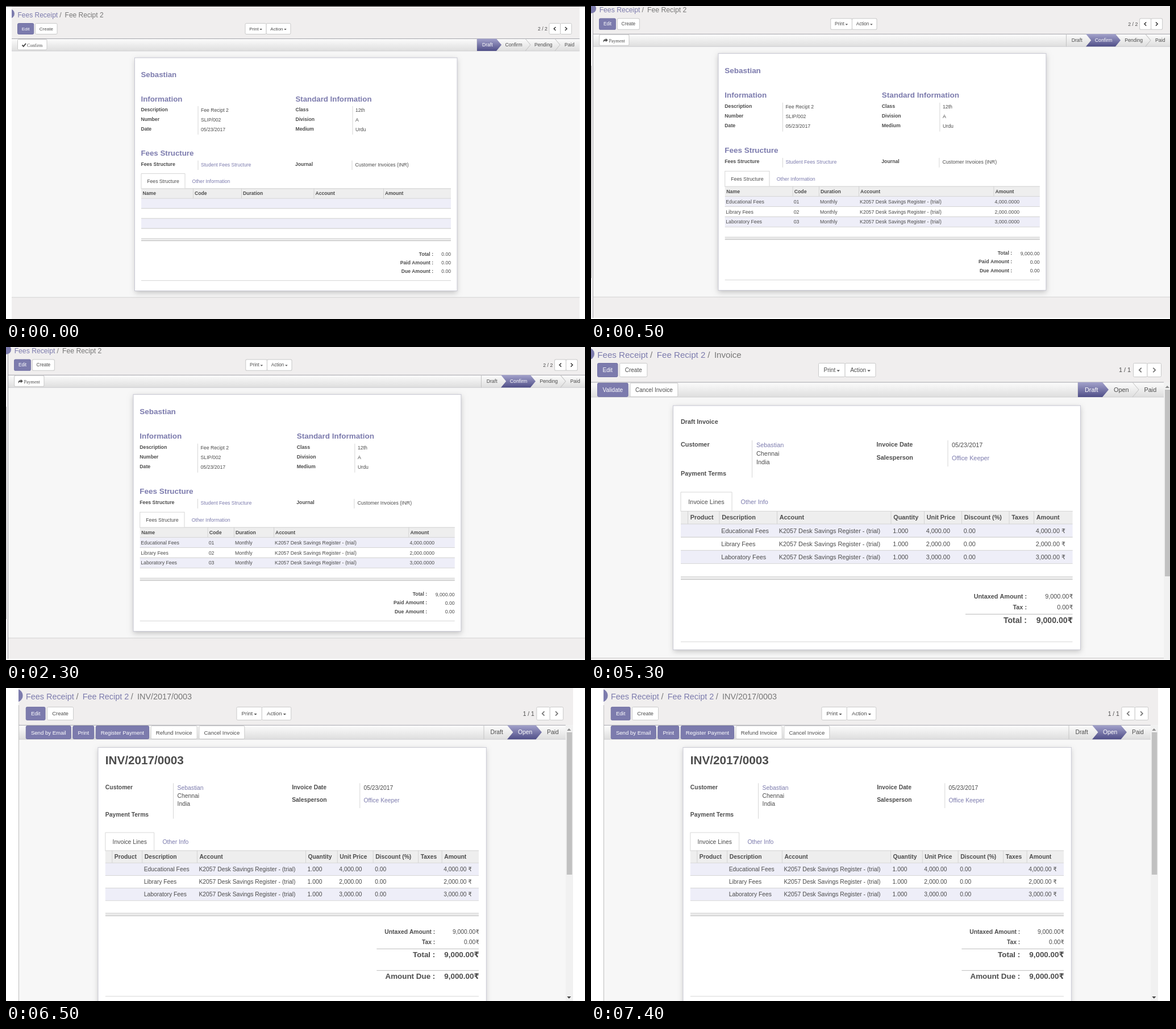
An HTML page with a canvas for the animation above (8000 ms loop, 1019 by 550 pixels).

```html
<!DOCTYPE html>
<html lang="en">
<head>
<meta charset="utf-8">
<title>Fee receipt to invoice</title>
<style>
html, body { margin: 0; width: 100%; height: 100%; overflow: hidden; background: #fff; }
canvas { display: block; }
</style>
</head>
<body>
<canvas id="stage" width="1019" height="550"></canvas>
<script>
const ctx = document.getElementById('stage').getContext('2d');
const INK = '#4c4c4c', PURPLE = '#7c7bad', PANEL = '#f0eeee', LINE = '#d6d6d6', TINT = '#eeeef8';
const SANS = '"Liberation Sans", Arial, sans-serif';
const STUDENT = 'Sebastian', CLERK = 'Office Keeper';
const LEDGER = 'K2057 Desk Savings Register - (trial)';
const FEES = [['Educational Fees', '4,000.00'], ['Library Fees', '2,000.00'], ['Laboratory Fees', '3,000.00']];

// y is the middle of the capitals
function text(s, x, y, size, { color = INK, bold = false, align = 'left', family = SANS } = {}) {
  ctx.font = `${bold ? 'bold ' : ''}${size}px ${family}`;
  ctx.textAlign = align;
  ctx.fillStyle = color;
  ctx.fillText(s, x, y + size * 0.36);
  return ctx.measureText(s).width;
}

const rupee = (x, y, size, style) => text('₹', x, y, size, { ...style, family: '"DejaVu Sans", sans-serif' });

function rect(x1, y1, x2, y2, fill) {
  ctx.fillStyle = fill;
  ctx.fillRect(x1, y1, x2 - x1, y2 - y1);
}

const hLine = (x1, x2, y, color = LINE) => rect(x1, y, x2, y + 1, color);
const vLine = (x, y1, y2, color = LINE) => rect(x, y1, x + 1, y2, color);

function poly(points, fill, stroke, width = 1) {
  ctx.beginPath();
  points.forEach(([x, y]) => ctx.lineTo(x, y));
  if (fill) { ctx.fillStyle = fill; ctx.fill(); }
  if (stroke) { ctx.strokeStyle = stroke; ctx.lineWidth = width; ctx.stroke(); }
}

function box(x, y, w, h, primary) {
  ctx.beginPath();
  ctx.roundRect(x, y, w, h, 2);
  ctx.fillStyle = primary ? PURPLE : '#fff';
  ctx.fill();
  ctx.strokeStyle = primary ? '#6f6ea2' : '#c9c9c9';
  ctx.lineWidth = 1;
  ctx.stroke();
}

// Returns the right edge
function button(label, x, y, h, size, { primary, caret } = {}) {
  const pad = size * 0.9;
  ctx.font = `${size}px ${SANS}`;
  const labelW = ctx.measureText(label).width;
  const w = labelW + pad * 2 + (caret ? size * 0.78 : 0);
  box(x, y, w, h, primary);
  text(label, x + pad, y + h / 2, size, { color: primary ? '#fff' : INK });
  if (caret) {
    const cx = x + pad + labelW + size * 0.5, r = size * 0.28, cy = y + h / 2;
    poly([[cx - r, cy], [cx + r, cy], [cx, cy + r]], INK);
  }
  return x + w;
}

function buttonRow(labels, x, y, h, size, primaryCount) {
  labels.forEach((label, i) => {
    x = button(label, x, y, h, size, { primary: i < primaryCount }) + size * 0.37;
  });
}

function pager(label, labelX, x, y, w, h, size, color) {
  text(label, labelX, y + h / 2, size);
  [-1, 1].forEach((dir, i) => {
    const left = x + i * w, cx = left + w / 2, cy = y + h / 2, r = size * 0.36;
    box(left, y, w, h);
    poly([[cx - dir * r / 2, cy - r], [cx + dir * r / 2, cy], [cx - dir * r / 2, cy + r]], null, color, size * 0.17);
  });
}

function crumbs(names, x, y, size) {
  names.forEach((name, i) => {
    const last = i === names.length - 1;
    x += text(name, x, y, size, { color: last ? '#777' : PURPLE });
    if (!last) {
      text('/', x + size * 0.25, y, size, { color: '#777' });
      x += size * 1.03;
    }
  });
}

function badge(x, y, r, left) {
  ctx.save();
  ctx.beginPath();
  ctx.rect(left, -20, 60, 80);
  ctx.clip();
  ctx.beginPath();
  ctx.arc(x, y, r, 0, 7);
  ctx.fillStyle = PURPLE;
  ctx.fill();
  ctx.restore();
}

function gradient(y1, y2, from, to) {
  const g = ctx.createLinearGradient(0, y1, 0, y2);
  g.addColorStop(0, from);
  g.addColorStop(1, to);
  return g;
}

// Stages: [label, text x, right edge of body]; each body ends in an arrow tip
function statusBar(x1, x2, y1, y2, start, stages, current, size, tip) {
  const mid = (y1 + y2) / 2;
  rect(x1, y1, x2, y2, gradient(y1, y2, '#fcfcfc', '#dedede'));
  hLine(x1, x2, y1 - 0.5, '#a5a5ac');
  hLine(x1, x2, y2 - 0.5, '#cfcfd2');
  vLine(start - 0.5, y1, y2, '#c4c4c4');
  let left = start;
  stages.forEach(([label, x, end], i) => {
    const arrow = [[end, y1], [end + tip, mid], [end, y2]];
    if (i === current) {
      const notch = i ? [[left, y2], [left + tip, mid], [left, y1]] : [[left, y2], [left, y1]];
      poly([...arrow, ...notch], gradient(y1, y2, '#a3a2cb', '#504f88'));
    } else if (i < stages.length - 1 && i + 1 !== current) {
      poly(arrow, null, '#c2c2c2');
    }
    text(label, x, mid - 0.3, size, { color: i === current ? '#fff' : INK });
    left = end;
  });
}

function sheet(x, y, w, h) {
  ctx.save();
  ctx.shadowColor = 'rgba(0,0,0,.22)';
  ctx.shadowBlur = 9;
  ctx.shadowOffsetY = 3;
  rect(x, y, x + w, y + h, '#fff');
  ctx.restore();
  ctx.strokeStyle = '#c8c8d3';
  ctx.lineWidth = 1;
  ctx.strokeRect(x, y, w, h);
}

function tabs(x1, x2, right, y1, y2, active, other, otherX, size) {
  hLine(x1, right, y2, LINE);
  poly([[x1, y2 + 1], [x1, y1], [x2, y1], [x2, y2 + 1]], '#fff', LINE);
  const y = (y1 + y2) / 2 + 0.4;
  text(active, (x1 + x2) / 2, y, size, { align: 'center' });
  text(other, otherX, y, size, { color: PURPLE });
}

function table({ x1, x2, top, head, pitch, rowCount, dividers, labels, inset, rows, size }) {
  const starts = [x1, ...dividers];
  const first = top + head;
  rect(x1, top, x2, first, '#eee');
  hLine(x1, x2, top, LINE);
  dividers.forEach(x => vLine(x - 0.5, top, first, '#d2d2d2'));
  labels.forEach((s, i) => text(s, starts[i] + inset, top + head / 2, size, { bold: true }));
  for (let r = 0; r < rowCount; r++) {
    const y = first + r * pitch;
    if (r % 2 === 0) rect(x1, y, x2, y + pitch, TINT);
    hLine(x1, x2, y - 0.5);
    hLine(x1, x2, y + pitch - 0.5);
    (rows[r] || []).forEach((s, i) => {
      const [number, currency] = s.split('₹');
      const x = starts[i] + inset - 1, mid = y + pitch / 2;
      const w = text(number, x, mid, size);
      if (currency !== undefined) rupee(x + w, mid, size);
    });
  }
}

function tableFoot(x1, x2, y, h) {
  rect(x1, y, x2, y + h, '#ebebeb');
  hLine(x1, x2, y, LINE);
  hLine(x1, x2, y + h - 1, '#bdbdbd');
}

function receipt(confirmed) {
  const size = 8.6, small = 8, title = 13.25;
  const heading = (s, x, y) => text(s, x, y, title, { bold: true, color: PURPLE });
  const field = (label, value, x, valueX, y, color) => {
    text(label, x, y, size, { bold: true });
    text(value, valueX, y + 1, size, { color });
  };
  rect(10, 0, 1009.5, 560, PANEL);
  rect(10, 79, 1009.5, 512, '#f7f7f7');
  hLine(10, 1009.5, 511.5, '#d4d4d4');
  badge(7, 13.5, 8, confirmed ? 0 : 10);
  crumbs(['Fees Receipt', 'Fee Recipt 2'], 20.5, 15.5, 12);
  buttonRow(['Edit', 'Create'], 20.5, 30.5, 19, small, 1);
  const actionX = button('Print', 421, 30.5, 19, small, { caret: true });
  button('Action', actionX, 30.5, 19, small, { caret: true });
  pager('2 / 2', 936, 956, 30.5, 19.7, 19, size, '#333');

  statusBar(10, 1009.5, 57.5, 79, 829, [['Draft', 838, 863], ['Confirm', 878.5, 914], ['Pending', 930, 966], ['Paid', 983, 1009]], confirmed ? 1 : 0, size, 9);
  box(20.5, 58.5, 51.5, 18.5);
  text(confirmed ? 'Payment' : 'Confirm', 37, 68.7, small, { family: '"Liberation Serif", "Times New Roman", serif' });
  if (confirmed) {
    poly([[27.5, 72], [27.5, 68.5], [29, 66.8], [31.5, 66.8], [31.5, 64.8], [35.5, 68], [31.5, 71.2], [31.5, 69.2], [29.3, 69.2]], INK);
  } else {
    poly([[28.5, 68.5], [30.8, 71], [35, 65.8]], null, INK, 1.9);
  }

  sheet(226.5, 91, 567.5, 409.5);
  heading(STUDENT, 237.5, 120);
  heading('Information', 237.5, 163);
  heading('Standard Information', 509.5, 163);
  vLine(337.5, 176, 226);
  vLine(609.5, 176, 226);
  [['Description', 'Fee Recipt 2', 'Class', '12th'], ['Number', 'SLIP/002', 'Division', 'A'], ['Date', '05/23/2017', 'Medium', 'Urdu']]
    .forEach(([a, b, c, d], i) => {
      const y = 181.5 + i * 17;
      field(a, b, 237.5, 343, y);
      field(c, d, 509.5, 615, y);
    });
  heading('Fees Structure', 237.5, 258.3);
  vLine(337.5, 271.5, 288);
  vLine(608.5, 271.5, 288);
  field('Fees Structure', 'Student Fees Structure', 237.5, 343, 277.7, PURPLE);
  field('Journal', 'Customer Invoices (INR)', 509, 614.5, 277.7);

  tabs(238, 315, 783, 294.5, 320.5, 'Fees Structure', 'Other Information', 327.5, size);
  table({
    x1: 238, x2: 783, top: 320.5, head: 17.6, pitch: 17.6, inset: 2.5, size,
    rowCount: confirmed ? 3 : 4,
    dividers: confirmed ? [355.5, 401, 470, 703.5] : [329.5, 414.5, 542, 664.5],
    labels: ['Name', 'Code', 'Duration', 'Account', 'Amount'],
    rows: confirmed ? FEES.map(([name, fee], i) => [name, '0' + (i + 1), 'Monthly', LEDGER, fee + '00']) : []
  });
  tableFoot(238, 783, 408, 5);
  const labelX = confirmed ? 735.3 : 752;
  [['Total :', confirmed ? '9,000.00' : '0.00'], ['Paid Amount :', '0.00'], ['Due Amount :', '0.00']].forEach(([label, value], i) => {
    text(label, labelX, 436 + i * 15, size, { bold: true, align: 'right' });
    text(value, 783, 436.3 + i * 15, size, { align: 'right' });
  });
  hLine(238, 783, 482);
}

function invoice(open) {
  const size = 10.85, small = 10.05, big = 14.05;
  const left = -2.4, right = 1021.7;
  const label = (s, x, y) => text(s, x, y, size, { bold: true });
  const link = (s, x, y) => text(s, x, y, size, { color: PURPLE });
  rect(left, -20, right, 62, PANEL);
  rect(left, 62, 1008, 580, '#f7f7f7');
  const crumbY = open ? 8.9 : 13.5;
  badge(open ? -6.5 : -4.5, crumbY - 1.5, open ? 12 : 10.5, left);
  crumbs(['Fees Receipt', 'Fee Recipt 2', open ? 'INV/2017/0003' : 'Invoice'], 11.3, crumbY, 15.1);
  buttonRow(['Edit', 'Create'], 11.5, 28.5, 24, small, 1);
  const actionX = button('Print', 400.5, 28.5, 24, small, { caret: true });
  button('Action', actionX, 28.5, 24, small, { caret: true });
  pager('1 / 1', 929, 954.5, 28.5, 24.5, 24, size, '#777');

  statusBar(left, 1008, 62, 88, 857, [['Draft', 869, 900], ['Open', 920, 953], ['Paid', 973.5, 1008]], open ? 1 : 0, size, 11);
  if (open) buttonRow(['Send by Email', 'Print', 'Register Payment', 'Refund Invoice', 'Cancel Invoice'], 11.5, 63.3, 24, small, 3);
  else buttonRow(['Validate', 'Cancel Invoice'], 11.5, 63.3, 24, small, 1);

  rect(1008, 62, right, 580, '#f1f1f1');
  rect(1010, 75, 1020, open ? 337.5 : 403, '#c1c1c1');
  poly([[1010.5, 72], [1018, 72], [1014.2, 68]], '#8a8a8a');
  if (open) {
    poly([[1010.5, 562], [1018, 562], [1014.2, 566]], '#444');
    vLine(left, 25, 580, '#bbb');
  } else {
    rect(0, 547, 1008, 549, PANEL);
    hLine(0, 1008, 546, '#cfcfcf');
    rect(0, 549, 1019, 550, '#fff');
  }

  sheet(144.5, 103, 717, open ? 520 : 429);
  if (open) text('INV/2017/0003', 158, 126.5, 21.7, { bold: true });
  else label('Draft Invoice', 158, 131);

  ctx.translate(0, open ? 4.9 : 0);
  vLine(283, 164, 229.5);
  vLine(627.5, 164, 210);
  label('Customer', 158, 171);
  label('Payment Terms', 158, 222);
  link(STUDENT, 291, 172);
  text('Chennai', 291, 187, size);
  text('India', 291, 202, size);
  label('Invoice Date', 502.5, 171);
  text('05/23/2017', 635, 172, size);
  label('Salesperson', 502.5, 194.5);
  link(CLERK, 635, 195.3);

  tabs(158, 248, 847.5, 255, 288, 'Invoice Lines', 'Other Info', 263.5, size);
  table({
    x1: 158, x2: 847.5, top: 288, head: 23, pitch: 23.2, rowCount: 3, inset: 4.2, size,
    dividers: [170.5, 226, 327.5, 528, 586.5, 652.5, 736, 779.5],
    labels: ['', 'Product', 'Description', 'Account', 'Quantity', 'Unit Price', 'Discount (%)', 'Taxes', 'Amount'],
    rows: FEES.map(([name, fee]) => ['', '', name, LEDGER, '1.000', fee, '0.00', '', fee + ' ₹'])
  });
  tableFoot(158, 847.5, 403, 6);

  const total = (name, value, y, fontSize, bold) => {
    const style = { bold, align: 'right' };
    text(name, 767, y, fontSize, { bold: true, align: 'right' });
    const w = rupee(848.3, y, fontSize, style);
    text(value, 848.3 - w, y, fontSize, style);
  };
  total('Untaxed Amount :', '9,000.00', 437.7, size);
  total('Tax :', '0.00', 457.2, size);
  hLine(659, 847.5, 469, '#bbb');
  total('Total :', '9,000.00', 480, big, true);
  if (open) {
    hLine(659, 847.5, 508.8, '#bbb');
    total('Amount Due :', '9,000.00', 520, big, true);
  }
  hLine(158, 847.5, open ? 556.5 : 517.5);
}

function draw(t) {
  const zoom = (scale, x, y) => ctx.setTransform(scale, 0, 0, scale, x, y);
  zoom(1, 0, 0);
  rect(0, 0, 1019, 550, '#fff');
  if (t < 500) {
    receipt(false);
    hLine(0, 1019, 0, '#111');
  } else if (t < 3500) {
    rect(0, 0, 4, 548, '#f4f3f4');
    zoom(1.0165, -6.2, -9.1);
    receipt(true);
    zoom(1, 0, 0);
    vLine(3, 12, 548, '#a9a9ae');
    vLine(0, 105, 478, '#b0b0b0');
    rect(0, 548, 1019, 550, '#fff');
  } else if (t < 6500) {
    invoice(false);
  } else {
    zoom(0.953, 24.3, 6.3);
    invoice(true);
  }
}

function tick() {
  draw(performance.now() % 8000);
  requestAnimationFrame(tick);
}
tick();
</script>
</body>
</html>
```
